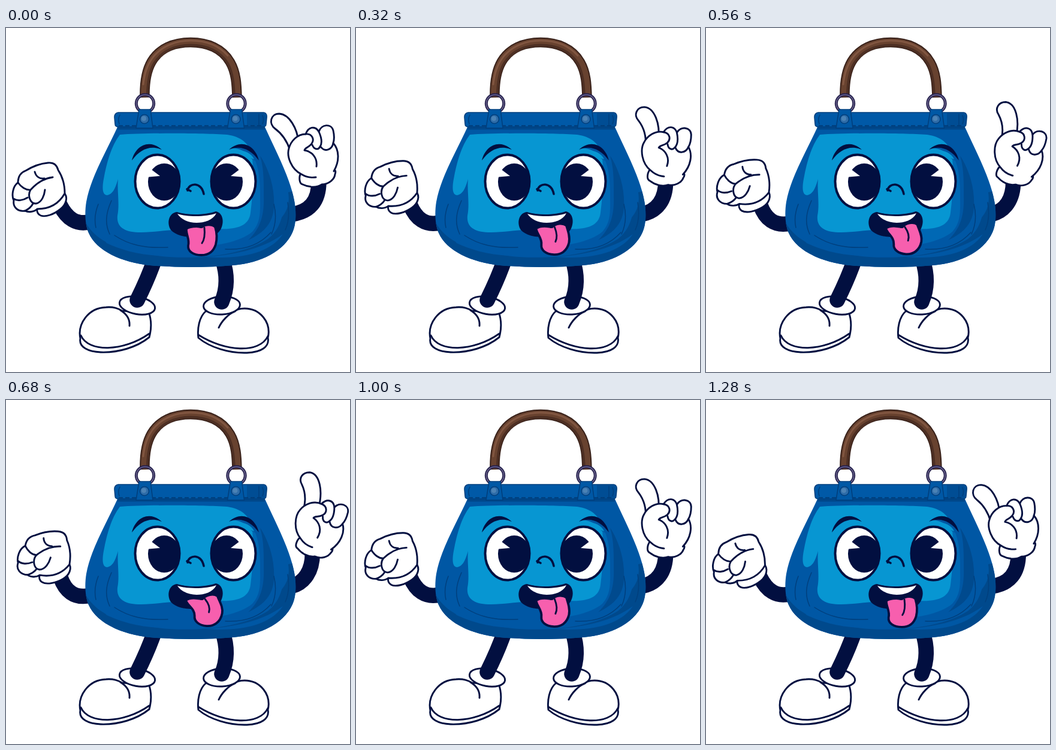
These frames come from a looping animation (574x574 px, 1.32 s). An HTML page:

```html
<!DOCTYPE html>
<html lang="en">
<head>
<meta charset="utf-8">
<title>Dancing handbag</title>
<style>
  html, body { margin: 0; width: 100%; height: 100%; overflow: hidden; background: #fff; }
  svg { display: block; width: 100vw; height: 100vh; }
  .ink { fill: none; stroke: #020f40; stroke-width: 2.9; stroke-linecap: round; stroke-linejoin: round; }
  .white { fill: #fff; }
  .limb { fill: none; stroke: #020f40; stroke-width: 25.5; stroke-linecap: round; }
  .navy { fill: #020f40; }
  .seam { stroke: #003f7d; stroke-width: 1.6; }
  .fold { fill: none; stroke: #003f7d; stroke-width: 1.5; stroke-linecap: round; }
</style>
</head>
<body>
<svg viewBox="0 0 574 574">
  <defs>
    <clipPath id="bodyClip"><use href="#body"/></clipPath>
    <g id="eye">
      <ellipse class="white" cx="252.5" cy="256" rx="37" ry="44.5" stroke="#020f40" stroke-width="4"/>
      <ellipse class="navy" cx="264" cy="257" rx="27" ry="31"/>
      <path class="white" d="M257 247L233 249L241 235Z"/>
      <path class="navy" d="M210 221C215 198 238 183 260 203C241 195 224 202 210 221Z"/>
    </g>
    <g id="clasp">
      <circle cx="232" cy="126" r="14.7" fill="none" stroke="#231f4b" stroke-width="5"/>
      <circle cx="232" cy="126" r="14.7" fill="none" stroke="#665f88" stroke-width="1.8"/>
      <path class="seam" fill="#0058a5" d="M222 136H241L245 167H217Z"/>
      <circle class="seam" cx="231" cy="152" r="7.5" fill="#2e6ca8"/>
      <circle cx="230" cy="151" r="4" fill="#4b82b5"/>
    </g>
  </defs>

  <!-- shoes and legs -->
  <g class="ink">
    <path class="white" d="M124 518C119 494 137 467 167 466C180 465 187 468 194 472L238 474C244 490 242 505 239 516C218 533 187 542 158 541C138 540 121 533 124 518Z"/>
    <path d="M125 513C137 541 195 541 239 510M191 471C201 477 207 486 206 497"/>
    <ellipse class="white" cx="219" cy="463" rx="30" ry="14.5" transform="rotate(10 219 463)"/>
    <path class="white" d="M334 472C322 482 319 502 321 517C340 533 373 543 402 542C426 541 440 532 437 517C443 491 424 468 398 468C389 468 383 470 377 474Z"/>
    <path d="M321 512C365 540 423 544 437 514M382 473C371 477 360 489 355 500"/>
    <ellipse class="white" cx="360" cy="463" rx="30.5" ry="15" transform="rotate(-3 360 463)"/>
  </g>
  <path class="limb" d="M248 386C238 415 229 434 219 454"/>
  <path class="limb" d="M361 386C370 412 369 436 360 457"/>

  <!-- arms and hands -->
  <path class="limb" id="armL"/>
  <path class="limb" id="armR"/>
  <g class="ink" id="fist">
    <path class="white" d="M96 274C104 281 101 294 91 302C80 311 66 316 58 313C53 311 51 306 52 302Z"/>
    <path class="white" d="M33 238C46 230 58 226 70 225C80 224 85 229 87 237C97 252 98 266 98 276C88 294 72 302 52 302C47 307 37 308 32 305C20 307 11 299 13 288C9 280 11 264 20 258C20 248 25 241 33 238Z"/>
    <path d="M48 240C50 248 56 252 64 251M78 249C62 251 50 260 41 270C36 278 39 293 50 293C60 291 64 279 65 270M20 258C25 265 33 271 41 270M13 285C19 289 28 288 36 283M32 305C36 303 42 299 45 293"/>
  </g>
  <path class="ink white" id="finger"/>
  <g class="ink" id="hand">
    <path class="white" d="M493 241C488 247 489 260 495 261C505 266 518 267 527 261C538 261 548 253 549 244C551 239 549 236 546 236Z"/>
    <path class="white" stroke="none" d="M493 244C476 236 468 214 472 201C475 189 486 177 500 177C505 164 516 163 522 173C526 160 543 159 546 171C548 180 548 186 546 192C556 203 557 222 546 240C540 248 508 251 493 244Z"/>
    <path d="M493 244C476 236 468 214 472 201C475 189 486 177 500 177C505 164 516 163 522 173C526 160 543 159 546 171C548 180 548 186 546 192C556 203 557 222 547 239M493 244C501 249 510 250 517 249"/>
    <path d="M500 177C511 176 515 186 510 193C505 200 499 199 498 204C510 206 520 216 518 231M522 173C527 184 528 192 524 198C521 204 514 203 511 195M546 192C544 203 532 208 525 198"/>
  </g>

  <!-- handle -->
  <g fill="none">
    <path stroke="#38211a" stroke-width="16.5" d="M231.5 116C231 94 233 73 243 56C256 34 280 24 308 24C336 24 361 34 374 57C384 74 385 95 385.5 116"/>
    <path stroke="#68422f" stroke-width="12.5" d="M231.5 115C231 94 233 73 243 56C256 34 280 24 308 24C336 24 361 34 374 57C384 74 385 95 385.5 115"/>
    <path stroke="#4d2f23" stroke-width="4" d="M236 114C236 94 238 75 247 59C260 38 283 28.500 308 28.500C336 28.500 358 39 370 59C379 76 380 95 381 114"/>
    <path stroke="#815641" stroke-width="3" stroke-linecap="round" d="M229 94C231 76 235 63 245 49C261 29 285 21 308 21C335 21 356 30 370 46"/>
  </g>

  <!-- bag -->
  <path id="body" fill="#0057a4" d="M187 163C167 207 141 250 134 290C131 308 132 329 138 342C151 372 193 391 240 396C285 400 335 400 379 396C427 392 465 371 478 341C485 325 484 304 481 288C474 250 451 207 431 163Z"/>
  <g clip-path="url(#bodyClip)">
    <path fill="#00498c" d="M130 318C145 356 191 372 240 378C295 388 388 384 437 352C459 335 466 306 462 276L490 270V402H130Z"/>
    <path fill="#0057a4" d="M152 339C178 361 212 372 270 380C226 381 192 370 168 359ZM333 382C372 379 424 372 462 344C443 372 401 387 333 382Z"/>
    <path fill="#0068b4" d="M392 186C416 205 424 238 424 275C424 307 426 323 411 340C392 356 356 362 340 363L280 340L400 320Z"/>
    <path fill="#004a8e" d="M424 213C439 236 449 268 447 299C446 324 431 342 404 354C426 333 431 310 430 280C430 250 430 235 424 213Z"/>
    <path fill="#0057a4" d="M452 240C462 265 463 291 457 319C473 303 475 285 468 262Z"/>
    <path fill="#0796d2" d="M190 178C230 175 326 175 369 178C391 181 406 192 410 211C415 246 411 284 408 308C406 328 389 337 354 335L298 337C270 336 250 341 225 341C199 341 184 333 186 313C190 293 185 272 187 252C182 269 178 277 169 279C161 279 160 268 163 252C168 224 176 196 190 178Z"/>
    <path fill="#0057a4" d="M376 200C392 193 413 204 424 226L409 218C399 205 391 201 376 200Z"/>
    <path fill="#0796d2" d="M383 204C397 203 410 209 414 219C403 216 391 212 383 204Z"/>
    <path class="fold" d="M176 288C166 310 165 327 173 344M154 294C148 309 147 320 150 333M181 346C205 362 232 368 270 366M366 369C398 371 424 361 442 341M447 294C452 314 450 329 443 344M470 291C473 309 471 326 466 337"/>
    <path fill="none" stroke="#00478a" stroke-width="5" d="M186 167H432"/>
  </g>
  <path class="seam" fill="#0059a7" d="M187 141H430Q436 142 435 150L434 160Q434 165 428 165H188Q182 165 182 160L181 149Q181 142 187 141Z"/>
  <path fill="#004d94" d="M402 142H429Q434 143 434 150L433 160Q432 164 428 164H402Z"/>
  <path fill="none" stroke="#003873" stroke-width="1.5" stroke-dasharray="7 4" d="M188 163H430"/>
  <path class="fold" d="M190 145Q186 152 189 160M422 144V162M428 146Q431 153 428 160"/>
  <use href="#clasp"/>
  <use href="#clasp" x="152.5"/>

  <!-- face -->
  <use href="#eye"/>
  <use href="#eye" transform="translate(632 0) scale(-1 1)"/>
  <path class="ink" style="stroke-width:3.6" d="M303 271C305 258 326 256 330 277M302 269L308 272"/>
  <path class="navy" d="M285 307C305 313 332 312 350 306C361 308 364 321 360 332C356 344 344 350 326 349C302 350 284 347 275 337C268 326 271 309 285 307Z"/>
  <path class="white" d="M286 310C304 316 335 315 351 309C345 321 331 325 318 325C304 325 292 319 286 310Z"/>
  <path class="ink" id="tongue" style="fill:#f75fae;stroke-width:3.8"/>
  <path class="ink" id="groove"/>
</svg>
<script>
const LOOP = 1320, STEP = 40;
const $ = id => document.getElementById(id);

// Each pair holds the rest pose and the raised pose of one shape.
const poses = {
  armL: ["M142 323C117 330 101 317 90 295", "M142 326C113 333 98 317 91 296"],
  armR: ["M476 311C507 307 522 289 522 256", "M476 311C498 305 511 285 511 256"],
  finger: [
    "M474 204C469 189 460 176 449 168C438 160 441 143 456 143C473 144 486 168 488 190",
    "M493 192C501 176 503 157 495 140C489 129 497 120 508 120C525 122 531 151 522 182"
  ],
  tongue: [
    "M301 335C306 331 313 331 318 331C322 331 325 333 327 332C333 327 344 327 349 332C352 342 352 353 350 361C346 374 337 379 326 379C313 379 303 373 304 363C307 353 300 344 301 335Z",
    "M300 334C305 331 313 330 319 331C323 331 326 333 328 332C334 325 346 322 353 327C356 336 363 345 361 356C358 371 347 378 335 377C322 376 314 369 315 360C315 347 303 344 300 334Z"
  ],
  groove: ["M331 333C332 343 332 352 327 359", "M332 332C338 339 341 347 339 354"]
};

const mix = ([a, b], p) => {
  const end = b.match(/[\d.]+/g);
  let i = 0;
  return a.replace(/[\d.]+/g, n => (+n + (end[i++] - n) * p).toFixed(2));
};

function draw(time) {
  const t = Math.floor((time % LOOP) / STEP) * STEP;
  const p = 1 - Math.abs(2 * t / LOOP - 1);
  for (const id in poses) $(id).setAttribute("d", mix(poses[id], p));
  $("fist").setAttribute("transform", `rotate(${10 * p} 112 322)`);
  $("hand").setAttribute("transform", `translate(0 ${-2 * p}) rotate(${26 * p} 517 235)`);
}

const start = performance.now();
const tick = () => {
  draw(performance.now() - start);
  requestAnimationFrame(tick);
};
tick();
</script>
</body>
</html>
```
